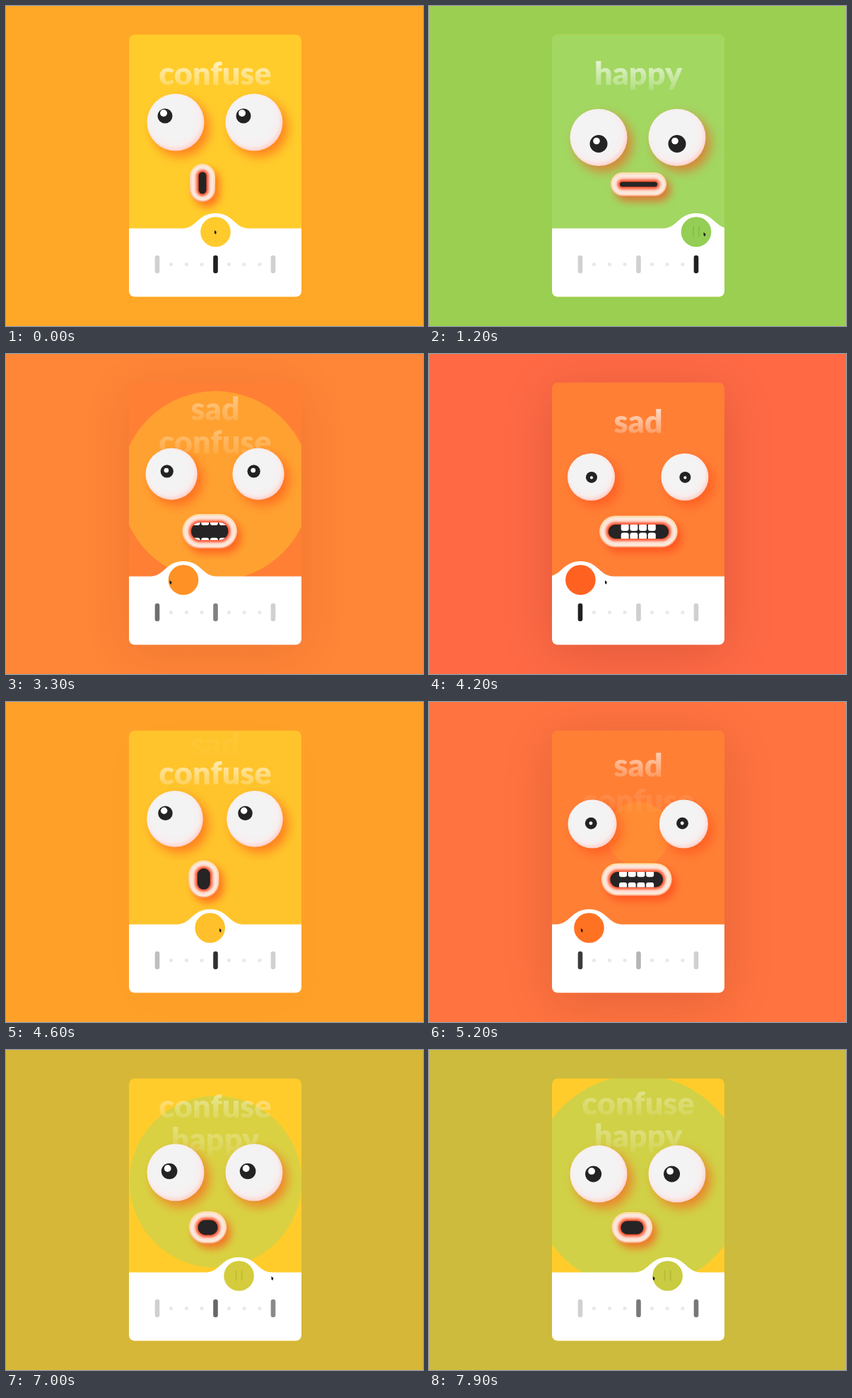
Recreate the animation shown at these times as an HTML page with a canvas. Size 590 by 454 pixels, loop 8000 ms.

```html
<!DOCTYPE html>
<html>
<head>
<meta charset="utf-8">
<style>
html, body { margin: 0; width: 100%; height: 100%; overflow: hidden; }
canvas { display: block; }
</style>
</head>
<body>
<canvas id="stage" width="590" height="454"></canvas>
<script>
const ctx = document.getElementById('stage').getContext('2d');
const LOOP = 8000;

// eye: [leftX, rightX, y, radius]; pupil: [dx, dy, radius]; glint: [dx, dy, radius]
// mouth and hole: [centerX, centerY, width, height] and [width, height]
const moods = [
  { word: 'sad', x: 214, bg: [255, 106, 69], card: [255, 127, 53], knob: [255, 98, 32],
    eye: [229.5, 362, 174.5, 33.5], pupil: [.5, .5, 8], glint: [0, .5, 2],
    mouth: [296.5, 252, 111, 45], hole: [86, 20], shade: [.09], teeth: [0] },
  { word: 'confuse', x: 296.5, bg: [255, 167, 38], card: [255, 204, 43], knob: [255, 202, 44],
    eye: [240, 351, 165, 40.5], pupil: [-15, -9, 10.5], glint: [-2, -4, 5],
    mouth: [278, 251, 36, 54], hole: [11, 31], shade: [0], teeth: [17] },
  { word: 'happy', x: 378, bg: [154, 207, 82], card: [162, 215, 98], knob: [148, 206, 84],
    eye: [240, 351, 186.5, 40.5], pupil: [0, 9, 12.5], glint: [-3, -4, 4.8],
    mouth: [296.5, 253, 79, 34], hole: [53, 7], shade: [0], teeth: [17] }
];

// [time, position on the 0..2 mood scale]
const knobKeys = [[0, 1], [100, 1], [800, 2], [1800, 2], [2280, 1], [2900, 1], [3650, 0],
  [4180, 0], [4700, 1], [4850, 1], [5315, 0], [5700, 0], [6300, 1], [6800, 1],
  [7260, 2], [7650, 2], [8155, 1]];
const cursorKeys = [[0, 295], [100, 297], [750, 389], [1750, 388], [2250, 315], [2850, 300],
  [3500, 212], [4050, 212], [4400, 305], [4750, 300], [5180, 215], [5600, 215],
  [6200, 296], [6700, 296], [7050, 380], [7500, 380], [8100, 295]];

const mix = (a, b, q) => a + (b - a) * q;
const mixAll = (a, b, q) => a.map((v, i) => mix(v, b[i], q));
const rgb = (c, a = 1) => `rgba(${c.map(Math.round)},${a})`;
const gray = v => rgb([v, v, v]);

function track(keys, t) {
  const i = Math.max(1, keys.findIndex(k => k[0] > t));
  const [t0, a] = keys[i - 1], [t1, b] = keys[i];
  const s = (t - t0) / (t1 - t0);
  return mix(a, b, s * s * (3 - 2 * s));
}

function fill(style, path) {
  ctx.fillStyle = style;
  ctx.beginPath();
  path();
  ctx.fill();
}
const disc = (x, y, r, style) => fill(style, () => ctx.arc(x, y, r, 0, 7));
const box = (x, y, w, h, r, style) => fill(style, () => ctx.roundRect(x, y, w, h, r));
const pill = (x, y, w, h, style) => box(x - w / 2, y - h / 2, w, h, Math.min(w, h) / 2, style);

function withShadow(color, dx, dy, blur, draw) {
  ctx.save();
  ctx.shadowColor = color;
  ctx.shadowOffsetX = dx;
  ctx.shadowOffsetY = dy;
  ctx.shadowBlur = blur;
  draw();
  ctx.restore();
}

function title(word, dy, alpha) {
  if (alpha <= 0) return;
  const y = 112 + dy;
  const g = ctx.createLinearGradient(0, y - 32, 0, y + 8);
  g.addColorStop(0, 'rgba(255,255,255,.7)');
  g.addColorStop(1, 'rgba(255,255,255,.15)');
  ctx.save();
  ctx.globalAlpha = alpha;
  ctx.font = '900 45px Lato, sans-serif';
  ctx.textAlign = 'center';
  ctx.fillStyle = g;
  ctx.fillText(word, 296, y);
  ctx.restore();
}

function eye(x, y, r, pupil, glint) {
  const g = ctx.createRadialGradient(x - 4, y - 6, r * .72, x - 2, y - 3, r * 1.08);
  g.addColorStop(0, '#f4f3f4');
  g.addColorStop(.6, '#f7eeee');
  g.addColorStop(1, '#ffd2ca');
  withShadow('rgba(255,70,20,.55)', 7, 8, 15, () => disc(x, y, r, g));
  const px = x + pupil[0], py = y + pupil[1];
  disc(px, py, pupil[2], '#242324');
  disc(px + glint[0], py + glint[1], glint[2], '#fff');
}

const lipStops = [[0, [255, 214, 172]], [.3, [251, 236, 228]], [.55, [255, 214, 200]],
  [.8, [255, 118, 84]], [1, [245, 74, 40]]];

function lipColor(s) {
  const i = Math.max(1, lipStops.findIndex(k => k[0] >= s));
  const [s0, a] = lipStops[i - 1], [s1, b] = lipStops[i];
  return mixAll(a, b, (s - s0) / (s1 - s0));
}

function mouth([x, y, w, h], [hw, hh], lift) {
  const rim = ctx.createLinearGradient(0, y - h / 2, 0, y + h / 2);
  rim.addColorStop(0, '#ffe0a4');
  rim.addColorStop(.5, '#ffd6b4');
  rim.addColorStop(1, '#ff9c7c');
  withShadow('rgba(255,60,20,.6)', 6, 7, 12, () => pill(x, y, w, h, rim));
  for (let s = .12; s < 1; s += .08) {
    pill(x, y, mix(w, hw, s), mix(h, hh, s), rgb(lipColor(s)));
  }
  pill(x, y, hw, hh, '#262425');
  ctx.save();
  ctx.clip();
  for (let i = 0; i < 4; i++) {
    const tx = x - 24.7 + i * 12.7;
    box(tx, y - 11 - lift, 11, 10, 3, '#fff');
    box(tx, y + 1.5 + lift, 11, 10, 3, '#fff');
  }
  ctx.restore();
}

function panel(x) {
  fill('#fff', () => {
    ctx.moveTo(170, 315.5);
    ctx.lineTo(x - 47, 315.5);
    ctx.bezierCurveTo(x - 27, 315.5, x - 25, 294, x, 294);
    ctx.bezierCurveTo(x + 25, 294, x + 27, 315.5, x + 47, 315.5);
    ctx.lineTo(422, 315.5);
    ctx.lineTo(422, 420);
    ctx.lineTo(170, 420);
  });
}

function scale(p) {
  moods.forEach((m, i) => {
    const near = Math.max(0, 1 - Math.abs(p - i));
    pill(m.x, 366.5, 6.6, 25.5, gray(mix(208, 32, near)));
  });
  for (const x of [233.5, 255.5, 277, 315.5, 337, 359]) disc(x, 366.5, 2.6, '#e9e9e9');
}

function cursor(x, y) {
  fill('#111', () => {
    ctx.moveTo(x, y);
    ctx.lineTo(x + 3.4, y + 3.2);
    ctx.lineTo(x + 2, y + 3.6);
    ctx.lineTo(x + 2.4, y + 5.4);
    ctx.lineTo(x + 1.4, y + 5.4);
    ctx.lineTo(x, y + 4.4);
  });
}

function draw(t) {
  const p = track(knobKeys, t);
  const from = moods[p < 1 ? 0 : 1], to = moods[p < 1 ? 1 : 2];
  const q = p < 1 ? p : p - 1;
  const at = key => mixAll(from[key], to[key], q);
  const x = mix(from.x, to.x, q);

  ctx.fillStyle = rgb(at('bg'));
  ctx.fillRect(0, 0, 590, 454);

  const shade = `rgba(70,20,20,${at('shade')[0] * 2})`;
  withShadow(shade, 0, 12, 70, () => box(174, 40.5, 244, 372, 8, rgb(from.card)));

  ctx.save();
  ctx.beginPath();
  ctx.roundRect(174, 40.5, 244, 372, 8);
  ctx.clip();
  // the next mood's colour spreads out from behind the face
  disc(296.5, 187, 300 * q, rgb(to.card, q));
  title(from.word, -40 * q, 1 - q);
  title(to.word, 52 * (1 - q), q);

  const [lx, rx, ey, er] = at('eye');
  eye(lx, ey, er, at('pupil'), at('glint'));
  eye(rx, ey, er, at('pupil'), at('glint'));
  mouth(at('mouth'), at('hole'), at('teeth')[0]);

  panel(x);
  ctx.restore();

  scale(p);
  disc(x, 320.5, 21.3, rgb(at('knob')));
  const grip = `rgba(60,70,0,${.14 * Math.min(1, Math.max(0, p - 1) * 8)})`;
  pill(x - 4, 320, 1.6, 15, grip);
  pill(x + 4, 320, 1.6, 15, grip);
  cursor(track(cursorKeys, t), 318 + 3 * Math.min(1, t / 800));
}

function frame(now) {
  draw(now % LOOP);
  requestAnimationFrame(frame);
}
requestAnimationFrame(frame);
</script>
</body>
</html>
```
